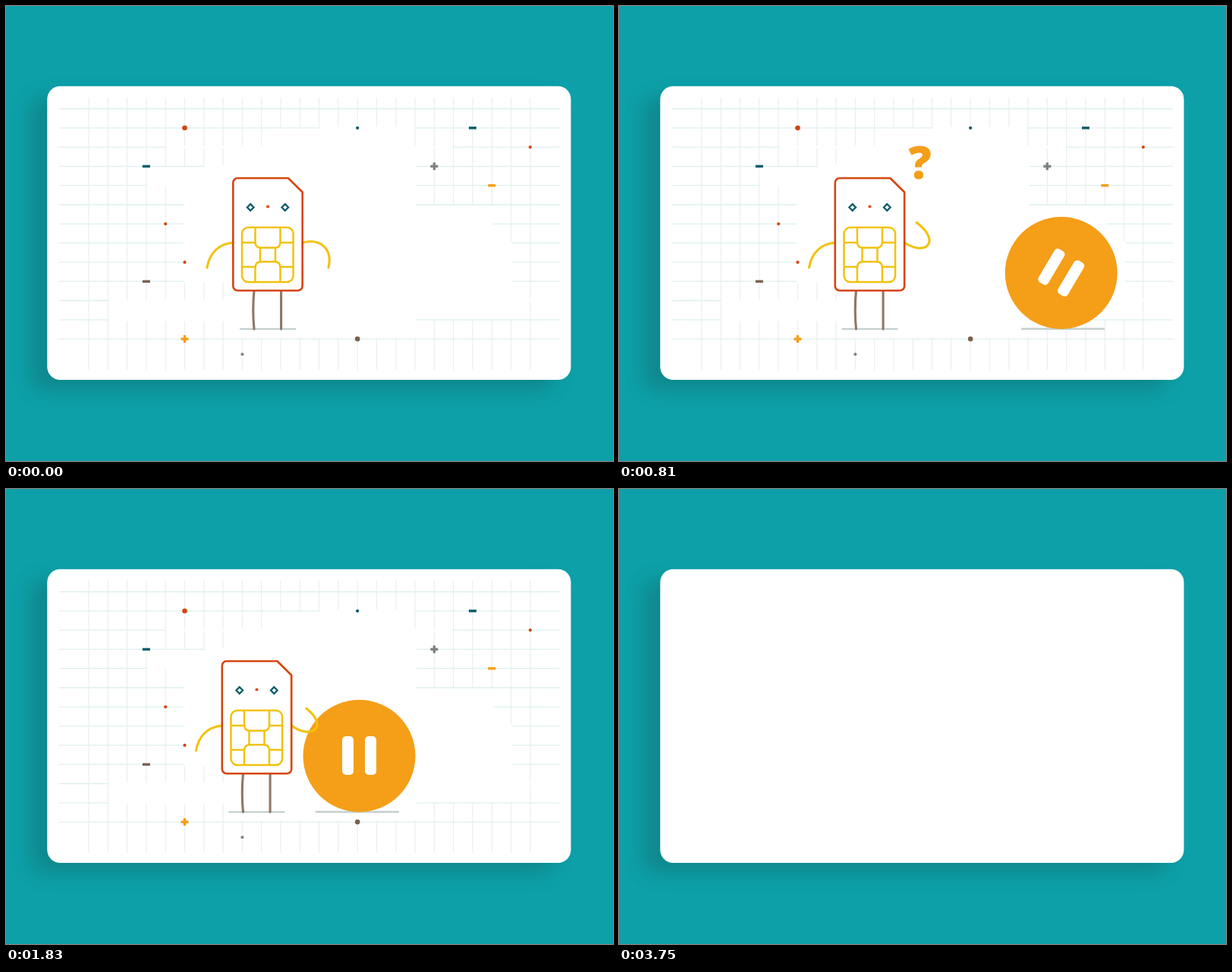
Write an HTML page with a canvas that moves like this. It is 800 px wide and 600 px high and loops after 3780 ms.

```html
<!DOCTYPE html>
<html lang="en">
<head>
<meta charset="utf-8">
<title>SIM card and pause ball</title>
<style>
  html, body { margin: 0; width: 100%; height: 100%; overflow: hidden; background: #0da0a8; }
  canvas { display: block; width: 800px; height: 600px; }
</style>
</head>
<body>
<canvas id="stage" width="800" height="600"></canvas>
<script>
const ctx = document.getElementById('stage').getContext('2d');
const LOOP = 3780, STEP = 30, BLANK = 3750;
const RED = '#d6450f', TEAL = '#0a5b6b', ORANGE = '#f59e18', BROWN = '#7a5f4e',
      GRAY = '#808080', YELLOW = '#f2c20c', LEG = '#8f7866', GROUND = '#c4d0cf';

const rad = deg => deg * Math.PI / 180;
const clamp = u => Math.min(1, Math.max(0, u));
const ease = u => u * u * (3 - 2 * u);
const ramp = (t, a, b) => ease(clamp((t - a) / (b - a)));
const mix = (p, q, u) => p.map((v, i) => v + (q[i] - v) * u);
// Distance left to go: steady speed that dies away softly around `stop`
const glide = (t, speed, stop, soft) => speed * soft * Math.log1p(Math.exp((stop - t) / soft));

function line(x1, y1, x2, y2, color, w) {
  ctx.strokeStyle = color;
  ctx.lineWidth = w;
  ctx.beginPath();
  ctx.moveTo(x1, y1);
  ctx.lineTo(x2, y2);
  ctx.stroke();
}

function limb(x, y, bend, color) {
  ctx.strokeStyle = color;
  ctx.lineWidth = 3.1;
  ctx.lineCap = 'round';
  ctx.beginPath();
  ctx.moveTo(x, y);
  ctx.bezierCurveTo(...bend);
  ctx.stroke();
  ctx.lineCap = 'butt';
}

function dot(x, y, r, color) {
  ctx.fillStyle = color;
  ctx.beginPath();
  ctx.arc(x, y, r, 0, Math.PI * 2);
  ctx.fill();
}

function box(x, y, w, h, r) {
  ctx.beginPath();
  ctx.roundRect(x, y, w, h, r);
}

function card() {
  ctx.fillStyle = '#0da0a8';
  ctx.fillRect(0, 0, 800, 600);
  ctx.save();
  ctx.shadowColor = 'rgba(20,80,80,.29)';
  ctx.shadowOffsetX = -22;
  ctx.shadowOffsetY = 14;
  ctx.shadowBlur = 25;
  ctx.fillStyle = '#fff';
  box(54.3, 105.7, 690.2, 387.3, 17);
  ctx.fill();
  ctx.restore();
}

const col = c => 109 + c * 25.3;
const row = r => 135.5 + r * 25.3;
// Cleared parts of the grid: left, top, right, bottom in cells
const HOLES = [
  [12, 0.9, 17, 1.1], [9, 1, 17, 2], [7, 1.9, 17.1, 12], [6, 2.9, 8, 3.1],
  [4, 1.9, 19, 2.1], [3, 3, 5, 4.1], [4.9, 3, 7.1, 9.1], [1, 9.9, 8, 11.1],
  [17, 5, 21.1, 11], [21, 6.9, 22.1, 11], [22, 9.9, 25, 10.1]
];

function grid() {
  for (let c = 0; c < 24; c++) line(col(c), 121, col(c), 480, '#eaeff0', 1.2);
  for (let r = 0; r < 13; r++) line(70, row(r), 730, row(r), '#dcf1ef', 1.3);
  ctx.fillStyle = '#fff';
  for (const [l, t, r, b] of HOLES)
    ctx.fillRect(col(l) + 1, row(t) + 1, col(r) - col(l) - 2, row(b) - row(t) - 2);
}

function marks() {
  const spot = (c, r, size, color) => dot(col(c), row(r), size, color);
  const dash = (c, r, color) => line(col(c) - 5, row(r), col(c) + 5, row(r), color, 3.4);
  const plus = (c, r, color) => {
    dash(c, r, color);
    line(col(c), row(r) - 5, col(c), row(r) + 5, color, 3.4);
  };
  spot(5, 1, 3.3, RED);
  spot(14, 1, 2.1, TEAL);
  spot(23, 2, 2.1, RED);
  spot(4, 6, 2.1, RED);
  spot(5, 8, 2.1, RED);
  spot(14, 12, 3.3, BROWN);
  spot(8, 12.8, 2, GRAY);
  dash(3, 3, TEAL);
  dash(20, 1, TEAL);
  dash(21, 4, ORANGE);
  dash(3, 9, BROWN);
  plus(18, 3, GRAY);
  plus(5, 12, ORANGE);
}

function ball(t) {
  if (t < 150) return;
  const x = 465.5 + glide(t, 0.36, 1130, 110);
  const y = Math.min(352, 170 + 0.00122 * (t - 150) ** 2);
  const turn = -360 * ease(clamp((t - 320) / 940) ** 1.25);
  const shade = 461.5 + glide(t, 0.36, 1124, 180);
  const half = 55 * (1 - (352 - y) / 41);

  ctx.save();
  ctx.beginPath();
  ctx.rect(70, 106, 660.6, 387);
  ctx.clip();
  if (half > 0) line(shade - half, 425.7, shade + half, 425.7, GROUND, 2.4);
  dot(x, y, 74, ORANGE);
  ctx.translate(x, y - 0.5);
  ctx.rotate(rad(turn));
  ctx.fillStyle = '#fff';
  for (const left of [-22.5, 7.5]) {
    box(left, -25.5, 15, 51, 5);
    ctx.fill();
  }
  ctx.restore();
}

function chip() {
  ctx.strokeStyle = YELLOW;
  ctx.lineWidth = 2.5;
  box(-34, -36, 67.6, 72, 8.5);
  ctx.stroke();
  for (const s of [-1, 1]) {
    ctx.beginPath();
    ctx.moveTo(-16.5, 36 * s);
    ctx.lineTo(-16.5, 17 * s);
    ctx.quadraticCurveTo(-16.5, 9.2 * s, -9, 9.2 * s);
    ctx.lineTo(9, 9.2 * s);
    ctx.quadraticCurveTo(16.5, 9.2 * s, 16.5, 17 * s);
    ctx.lineTo(16.5, 36 * s);
    ctx.stroke();
    line(-34, 16 * s, -16.5, 16 * s, YELLOW, 2.5);
    line(16.5, 16 * s, 33.6, 16 * s, YELLOW, 2.5);
    line(10 * s, -9, 10 * s, 9, YELLOW, 2.5);
  }
}

function face(t) {
  const blink = ramp(t, 870, 930) - ramp(t, 960, 1020);
  const shut = Math.max(blink, ramp(t, 2310, 2520));
  const w = 4.3 + 0.7 * shut, h = 4.3 * (1 - shut);
  ctx.strokeStyle = TEAL;
  ctx.lineWidth = 2.3 + 1.1 * shut;
  ctx.lineJoin = 'miter';
  ctx.miterLimit = 2;
  for (const x of [-22.8, 22.8]) {
    ctx.beginPath();
    ctx.moveTo(x - w, -62.5);
    ctx.lineTo(x, -62.5 - h);
    ctx.lineTo(x + w, -62.5);
    ctx.lineTo(x, -62.5 + h);
    ctx.closePath();
    ctx.stroke();
  }
  const open = ramp(t, 3090, 3420);
  dot(0, -63.5, 2.1 + 3 * open, '#e04e22');
  if (open > 0) dot(0, -63.5, 3 * open, '#fff');
}

function shell() {
  ctx.beginPath();
  ctx.moveTo(0, -101);
  ctx.lineTo(27, -101);
  ctx.lineTo(45.7, -82.5);
  ctx.arcTo(45.7, 47.3, 0, 47.3, 6);
  ctx.arcTo(-45.7, 47.3, -45.7, 0, 6);
  ctx.arcTo(-45.7, -101, 0, -101, 6);
  ctx.closePath();
  ctx.fillStyle = '#fff';
  ctx.fill();
  ctx.strokeStyle = RED;
  ctx.lineWidth = 2.6;
  ctx.lineJoin = 'round';
  ctx.stroke();
}

// Arm bends (two handles and the hand), measured from the middle of the chip
const LEFT = {
  hang: [-66, -14, -77, -1, -80, 17],
  raise: [-58, -13, -70, -9.5, -82, -8.5],
  drop: [-48, 5, -49, 28, -49, 48]
};
const RIGHT = {
  hang: [69, -22, 86, -8, 80, 17],
  think: [71.5, 2, 96, -16, 61.7, -42.5],
  reach: [71, 3, 96, -14, 65.5, -38.5],
  push: [66, -12, 92, -42, 47, -48]
};

function person(t) {
  const move = ramp(t, 150, 480), lean = ramp(t, 1830, 2280);
  const x = 345 - 14.5 * move - 6.5 * lean, y = 328 - 0.7 * lean, turn = rad(13.7 * lean);
  const sin = Math.sin(turn), cos = Math.cos(turn);

  const middle = 345 - 14.5 * move - 13.5 * lean, half = 37 - 15 * lean;
  line(middle - half, 425.9, middle + half, 425.9, GROUND, 2.4);
  for (const hip of [-18, 17.6]) {
    const hx = x + hip * cos - 47 * sin, hy = y + hip * sin + 47 * cos;
    const foot = middle + hip * (1 - 0.16 * lean);
    const bow = (hip < 0 ? -1.6 : 0) - 8 * lean;
    limb(hx, hy, [hx + bow, hy + 17, foot + bow - 3 * lean, 410, foot, 426], LEG);
  }

  const raise = ramp(t, 150, 510) - ramp(t, 510, 780);
  const leftArm = mix(mix(LEFT.hang, LEFT.raise, raise), LEFT.drop, ramp(t, 1830, 2500));
  const thinking = mix(mix(RIGHT.hang, RIGHT.think, move), RIGHT.reach, ramp(t, 1230, 1740));
  ctx.save();
  ctx.translate(x, y);
  ctx.rotate(turn);
  limb(-46, -16, leftArm, YELLOW);
  limb(46, -16, mix(thinking, RIGHT.push, lean), YELLOW);
  shell();
  chip();
  face(t);
  ctx.restore();
}

function question(t) {
  const on = ramp(t, 210, 450), off = ramp(t, 1380, 1650);
  ctx.globalAlpha = on * (1 - off);
  ctx.fillStyle = ORANGE;
  ctx.font = '800 60px "Open Sans", sans-serif';
  ctx.textAlign = 'center';
  ctx.fillText('?', 396.7, 228.3 + 24 * (1 - on - off));
  ctx.globalAlpha = 1;
}

function draw(now) {
  const t = Math.floor((now % LOOP) / STEP) * STEP;
  card();
  if (t >= BLANK) return;
  grid();
  marks();
  ball(t);
  person(t);
  question(t);
}

const start = performance.now();
function loop() {
  draw(performance.now() - start);
  requestAnimationFrame(loop);
}
loop();
</script>
</body>
</html>
```
